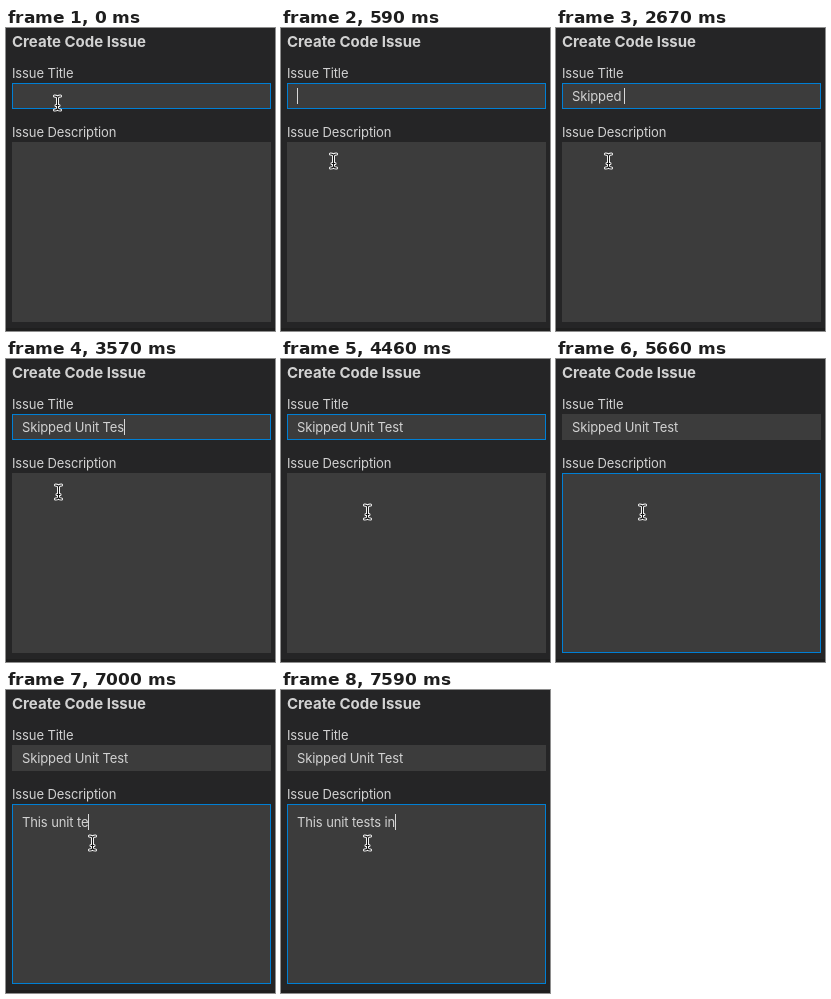
An HTML page that plays this animation: 269x303 px, repeating every 8 s.

```html
<!DOCTYPE html>
<html lang="en">
<head>
<meta charset="utf-8">
<title>Create Code Issue</title>
<style>
  html, body { margin: 0; width: 100%; height: 100%; overflow: hidden; background: #252526; }
  svg { display: block; width: 269px; height: 303px; }
  text { font: 13px Inter, "Liberation Sans", sans-serif; fill: #d2d2d2; letter-spacing: -0.12px; white-space: pre; }
  .heading { font-size: 15px; font-weight: 700; letter-spacing: 0; }
  .field { fill: #3c3c3c; }
  .ring { fill: none; stroke: #007fd4; }
  .caret { fill: #d8d8d8; }
  #mouse path { fill: none; stroke-linecap: round; stroke-linejoin: round; }
</style>
</head>
<body>
<svg viewBox="0 0 269 303">
  <rect width="269" height="303" fill="#252526"/>
  <rect y="300" width="269" height="3" fill="#1f1f1f"/>
  <text class="heading" x="6" y="19">Create Code Issue</text>
  <text x="6" y="50">Issue Title</text>
  <text x="6" y="109">Issue Description</text>
  <rect class="field" x="6" y="55" width="259" height="26"/>
  <rect class="field" x="6" y="114" width="259" height="180"/>
  <rect class="ring" id="titleRing" x="6.5" y="55.5" width="258" height="25"/>
  <rect class="ring" id="descRing" x="6.5" y="114.5" width="258" height="179"/>
  <text id="title" x="16" y="73"></text>
  <text id="desc" x="16" y="137"></text>
  <rect class="caret" id="titleCaret" y="60" width="1" height="16"/>
  <rect class="caret" id="descCaret" y="124" width="1" height="16"/>
  <g id="mouse">
    <path d="M-3-7Q0-7 0-5Q0-7 3-7M0-5V5M-3 7Q0 7 0 5Q0 7 3 7M-1.5 2.5H1.5" stroke="#fff" stroke-width="3"/>
    <path d="M-3-7Q0-7 0-5Q0-7 3-7M0-5V5M-3 7Q0 7 0 5Q0 7 3 7M-1.5 2.5H1.5" stroke="#111" stroke-width="1.1"/>
  </g>
</svg>
<script>
const LOOP = 8000, TICK = 148.8;
const TITLE = "Skipped Unit Test", DESC = "This unit tests in";
const el = id => document.getElementById(id);
const show = (node, on) => node.setAttribute("visibility", on ? "visible" : "hidden");
const clamp = (v, lo, hi) => Math.min(hi, Math.max(lo, v));

function ease(k, from, to) {
  const p = clamp((k - from) / (to - from), 0, 1);
  return p * p * (3 - 2 * p);
}

// Both fields begin with a mistyped letter that is then erased.
function titleText(k) {
  if (k < 7) return "";
  if (k >= 8 && k < 11) return "Si";
  return TITLE.slice(0, clamp(1 + Math.round((k - 11) * 8 / 7), 1, TITLE.length));
}

function descText(k) {
  if (k === 34) return "T";
  return DESC.slice(0, clamp(Math.round((k - 38) * 18 / 13), 0, DESC.length));
}

function setField(name, text, focused, caretOn) {
  const node = el(name), caret = el(name + "Caret");
  if (node.textContent !== text) node.textContent = text;
  const width = text ? node.getComputedTextLength() : 0;
  caret.setAttribute("x", Math.round(15.7 + width));
  show(caret, caretOn);
  show(el(name + "Ring"), focused);
}

function draw(ms) {
  const k = Math.floor((ms % LOOP + 8) / TICK);
  const inDesc = k >= 31;
  setField("title", titleText(k), !inDesc, k >= 4 && k < 28);
  setField("desc", descText(k), inDesc, inDesc && k !== 38);

  const down = ease(k, 0, 4), across = ease(k, 27, 30);
  const x = 51.5 + down + 34 * across;
  const y = 75 + 58 * down + 20 * across;
  el("mouse").setAttribute("transform", `translate(${x} ${y})`);
}

let start;
function loop(now) {
  start ??= now;
  draw(now - start);
  requestAnimationFrame(loop);
}
draw(0);
requestAnimationFrame(loop);
</script>
</body>
</html>
```
